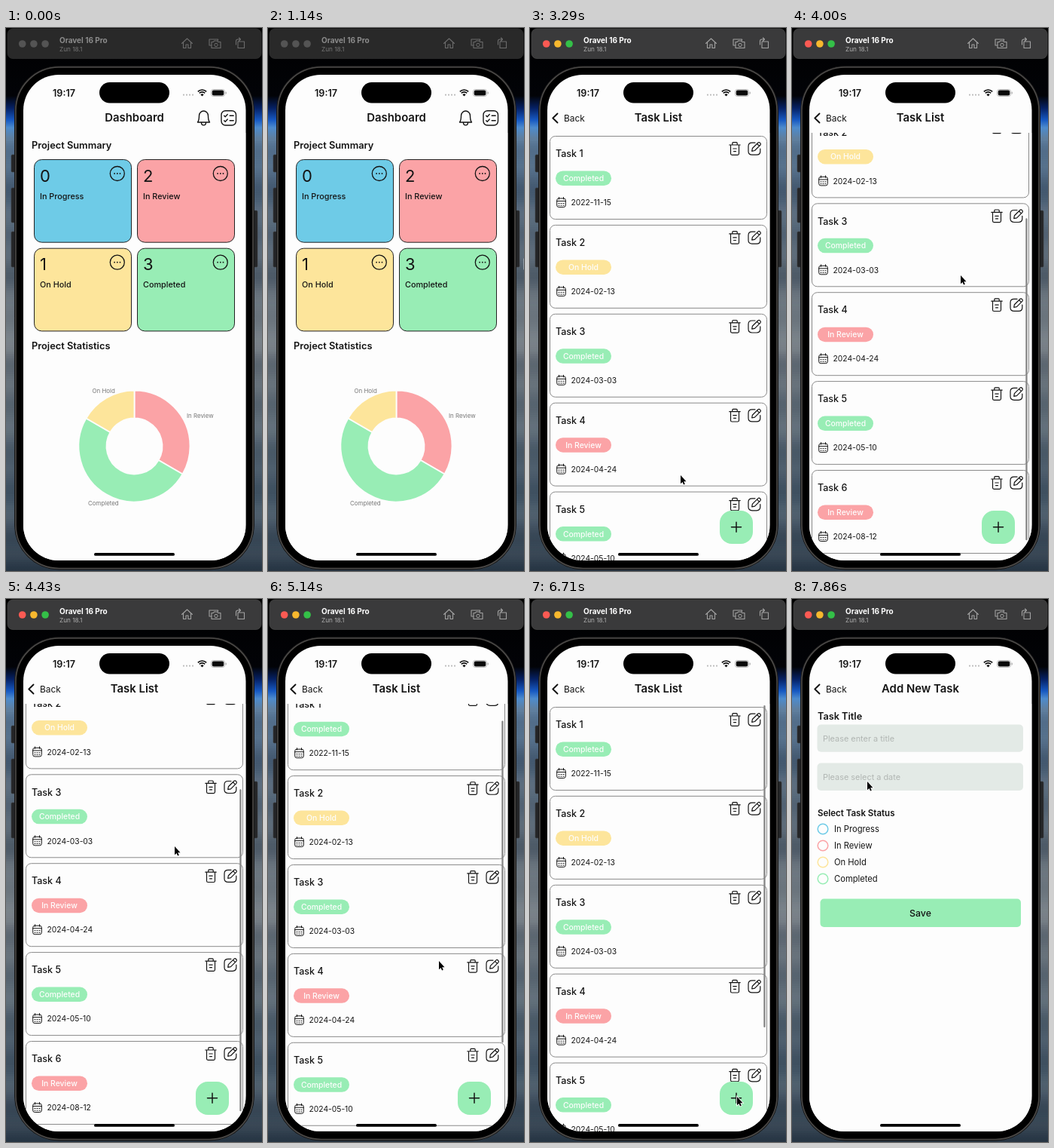
Recreate the animation shown at these times as an HTML page with a canvas. Size 340 by 720 pixels, loop 8 s.

```html
<!DOCTYPE html>
<html lang="en">
<head>
<meta charset="utf-8">
<title>Task app demo</title>
<style>
  html, body { margin: 0; width: 100%; height: 100%; overflow: hidden; background: #000; }
  canvas { display: block; width: 340px; height: 720px; }
</style>
</head>
<body>
<canvas id="stage"></canvas>
<script>
const canvas = document.getElementById('stage');
const ctx = canvas.getContext('2d');
const dpr = window.devicePixelRatio || 1;
canvas.width = 340 * dpr;
canvas.height = 720 * dpr;

const LOOP = 8000, FPS = 7;
const INK = '#141414', PAPER = '#fdfdfd';
const STATUS = {
  'In Progress': '#6ecbe7', 'In Review': '#fba3a6', 'On Hold': '#fde59b', 'Completed': '#98edb5'
};
const GREEN = STATUS.Completed;
const TASKS = [
  ['Completed', '2022-11-15'], ['On Hold', '2024-02-13'], ['Completed', '2024-03-03'],
  ['In Review', '2024-04-24'], ['Completed', '2024-05-10'], ['In Review', '2024-08-12']
];
const ICONS = {
  bell: 'M-8 5.5C-6 3-6 1-6-3C-6-7-3-9.5 0-9.5C3-9.5 6-7 6-3C6 1 6 3 8 5.5ZM-3 6C-3 10.5 3 10.5 3 6',
  checklist: 'M-6-3l1.5 1.5 3-3.2M-6 3.5l1.5 1.5 3-3.2M1.5-3H6.5M1.5 3.5H6.5',
  trash: 'M-7.2-5H7.2M-3.2-5V-7.3Q-3.2-8.3-2.2-8.3H2.2Q3.2-8.3 3.2-7.3V-5M-5.5-5V6.5Q-5.5 8.3-3.7 8.3H3.7Q5.5 8.3 5.5 6.5V-5M-2.2 0H2.2M-1.5 3.6H1.5',
  edit: 'M1-7.8H-3Q-8-7.8-8-3V3.5Q-8 8.2-3 8.2H3Q7.8 8.2 7.8 3.5V0M-3.3 3.3L-2.6-.5L5-8Q6.2-9 7.6-7.6Q9-6.2 8-5L.5 2.5ZM3.5-6.5L6.5-3.5',
  calendar: 'M-6-2H6M-3-7V-4.5M3-7V-4.5M-3.5 1h1M-.5 1h1M2.5 1h1M-3.5 3.7h1M-.5 3.7h1M2.5 3.7h1',
  chevron: 'M3-6L-3.2 0L3 6',
  plus: 'M-6.5 0H6.5M0-6.5V6.5',
  home: 'M-7 0L0-6.5L7 0M-5-1.5V6H-1.5V1.5H1.5V6H5V-1.5',
  camera: 'M-5 2.5H-7.5V-5.5H4V-4M-4.5-2H-2L-1-3.5H3L4-2H7.5V6H-4.5Z',
  rotate: 'M-3.5-2.5H5V6H-3.5ZM-6 1.5V-3Q-6-5.5-3.5-5.5H0M-2-7.5L0-5.5L-2-3.5'
};
for (const name in ICONS) ICONS[name] = new Path2D(ICONS[name]);

const clamp = v => Math.max(0, Math.min(1, v));
const smooth = v => v * v * (3 - 2 * v);
const pushEase = v => 1 - (1 - clamp(v)) ** 3;

// Eased interpolation through [time, ...values] keys.
function track(t, keys) {
  let i = 0;
  while (i < keys.length - 2 && t >= keys[i + 1][0]) i++;
  const [a, b] = [keys[i], keys[i + 1]];
  const k = smooth(clamp((t - a[0]) / (b[0] - a[0])));
  return a.slice(1).map((v, n) => v + (b[n + 1] - v) * k);
}

const CURSOR = [
  [1000, 346, 330], [1710, 293, 116], [2430, 293, 116], [3140, 200, 593], [3430, 200, 593],
  [4000, 224, 328], [4570, 224, 328], [5140, 227, 480], [5700, 227, 480], [6430, 275, 660],
  [7000, 275, 660], [7700, 100, 242]
];
const SCROLL = [[3430, 0], [4000, 146.5], [4600, 146.5], [5347, 0]];

function box(x, y, w, h, r, fill, stroke, lw = 1) {
  ctx.beginPath();
  ctx.roundRect(x, y, w, h, r);
  if (fill) { ctx.fillStyle = fill; ctx.fill(); }
  if (stroke) { ctx.strokeStyle = stroke; ctx.lineWidth = lw; ctx.stroke(); }
}

function circle(x, y, r, fill, stroke, lw = 1) {
  box(x - r, y - r, 2 * r, 2 * r, r, fill, stroke, lw);
}

function text(str, x, y, size, weight = 400, color = INK, align = 'left') {
  ctx.font = `${weight} ${size}px Inter, "Open Sans", sans-serif`;
  ctx.textAlign = align;
  ctx.fillStyle = color;
  ctx.fillText(str, x, y);
}

function icon(name, x, y, lw = 1.2, color = INK) {
  ctx.save();
  ctx.translate(x, y);
  ctx.lineCap = ctx.lineJoin = 'round';
  ctx.lineWidth = lw;
  ctx.strokeStyle = color;
  ctx.stroke(ICONS[name]);
  ctx.restore();
}

function wallpaper() {
  const sky = ctx.createLinearGradient(0, 0, 0, 720);
  const stops = [
    [0, '#000'], [90, '#020307'], [106, '#052063'], [122, '#1759c2'], [132, '#4d8bcd'], [146, '#5f7f9f'],
    [230, '#4b5f74'], [330, '#5f6b76'], [430, '#747c83'], [520, '#566470'], [620, '#485a6a'], [720, '#2b3947']
  ];
  stops.forEach(([y, c]) => sky.addColorStop(y / 720, c));
  ctx.fillStyle = sky;
  ctx.fillRect(0, 0, 340, 720);
  for (let y = 150; y < 720; y += 3) {
    const cloud = Math.sin(y * 0.11) + Math.sin(y * 0.047 + 2);
    ctx.fillStyle = cloud > 0 ? `rgba(200,205,210,${cloud * 0.06})` : `rgba(10,25,45,${-cloud * 0.1})`;
    ctx.fillRect(0, y, 340, 3);
  }
}

function toolbar(active) {
  box(2, 1, 337, 39.5, 7, active ? '#3a3a3b' : '#292929', active ? '#4a4a4a' : '#333', 0.7);
  ['#fb5a53', '#f7b82e', '#34c048'].forEach((c, i) => circle(21.7 + i * 15.2, 21, 4.8, active ? c : '#545454'));
  text('Oravel 16 Pro', 71, 20, 10, 700, active ? '#fff' : '#8c8c8c');
  text('Zun 18.1', 71, 30.5, 8.2, 400, active ? '#b0b0b0' : '#777');
  const tint = active ? '#a2a2a2' : '#6c6c6c';
  icon('home', 240.5, 20.5, 1.1, tint);
  icon('camera', 277.5, 20.5, 1.1, tint);
  circle(279, 22.5, 2.2, null, tint);
  icon('rotate', 311.5, 20.5, 1.1, tint);
}

function phoneBody() {
  for (const [x, y, h] of [[7, 168, 23], [7, 212, 46], [7, 270, 47], [329, 242, 75]]) {
    box(x, y, 5, h, 1.5, '#242527', '#3d3e40', 0.6);
  }
  box(11.5, 50.5, 318, 667.5, 59, '#1c1b1b', '#171717', 1);
  box(13, 52, 315, 664.5, 57.5, '#000', '#4c4a48', 1.6);
  box(15.5, 54.5, 310, 659.5, 55, '#000');
}

function statusBar() {
  text('19:17', 77, 90.5, 12.6, 600, INK, 'center');
  box(124, 72, 93, 27.5, 13.7, '#000');
  for (let i = 0; i < 4; i++) circle(236 + i * 4, 88.7, 1.1, '#bdbdbd');
  ctx.strokeStyle = ctx.fillStyle = '#0a0a0a';
  ctx.lineWidth = 1.7;
  for (const r of [8, 5.2]) {
    ctx.beginPath();
    ctx.arc(260.5, 90, r, -Math.PI * 0.75, -Math.PI * 0.25);
    ctx.stroke();
  }
  ctx.beginPath();
  ctx.moveTo(260.5, 90.5);
  ctx.arc(260.5, 90.5, 3, -Math.PI * 0.75, -Math.PI * 0.25);
  ctx.fill();
  box(272.5, 81.5, 18, 9, 2.8, null, '#aaa', 0.8);
  box(273.7, 82.6, 15.6, 6.8, 2, '#0a0a0a');
  box(291.6, 84.5, 1.2, 3, 0.6, '#aaa');
}

function donut(cx, cy) {
  let from = -Math.PI / 2;
  for (const [name, count] of [['In Review', 2], ['Completed', 3], ['On Hold', 1]]) {
    const to = from + count * Math.PI / 3;
    ctx.beginPath();
    ctx.arc(cx, cy, 74, from, to);
    ctx.arc(cx, cy, 37, to, from, true);
    ctx.closePath();
    ctx.fillStyle = STATUS[name];
    ctx.strokeStyle = PAPER;
    ctx.lineWidth = 1.8;
    ctx.fill();
    ctx.stroke();
    from = to;
  }
}

function dashboard() {
  text('Project Summary', 34, 159.5, 12.8, 600);
  const cards = [['In Progress', 0], ['In Review', 2], ['On Hold', 1], ['Completed', 3]];
  cards.forEach(([name, count], i) => {
    const x = 37.5 + (i % 2) * 137, y = 174.5 + (i >> 1) * 117.7;
    box(x, y, 129, 109.7, 10, STATUS[name], '#222', 1);
    text(count, x + 7.5, y + 29, 22);
    text(name, x + 7.5, y + 52, 10.8, 500);
    circle(x + 110.3, y + 18.5, 9.5, null, INK, 1.3);
    for (const d of [-3.7, 0, 3.7]) circle(x + 110.3 + d, y + 18.5, 0.9, INK);
  });
  text('Project Statistics', 34, 426, 12.8, 600);
  donut(170.5, 554.5);
  text('In Review', 240, 517, 7.9, 400, '#777');
  text('On Hold', 114.5, 483.5, 7.9, 400, '#777');
  text('Completed', 109, 632.5, 7.9, 400, '#777');
}

function taskList(t) {
  const [scroll] = track(t, SCROLL);
  TASKS.forEach(([status, date], i) => {
    const y = 143.5 + i * 117.9 - scroll;
    box(26.5, y, 288, 110, 7, null, '#8a8a8a', 1);
    text('Task ' + (i + 1), 34, y + 27.7, 12.5, 500);
    box(34, y + 46, 74, 19.5, 9.7, STATUS[status]);
    text(status, 71, y + 59.5, 10.4, 500, PAPER, 'center');
    box(35.7, y + 82.5, 11.6, 11.5, 2.5, null, INK, 1);
    icon('calendar', 41.5, y + 88, 1);
    text(date, 54.5, y + 91.7, 10.3);
    icon('trash', 272, y + 16.5);
    icon('edit', 298, y + 16.5);
  });
  ctx.globalAlpha = clamp((t - 3430) / 200);
  box(310.3, 141 + scroll * 0.76, 2.3, 427, 1.1, '#858585');
  ctx.globalAlpha = 1;
  box(252, 640, 44, 44, 16, GREEN);
  icon('plus', 274, 661.7, 1.5);
}

function taskForm() {
  text('Task Title', 34, 159.5, 12.7, 600);
  box(33.5, 166.5, 273.5, 36.3, 5, '#e3eae6');
  text('Please enter a title', 41, 188.5, 10.9, 400, '#b1b6b3');
  box(33.5, 217.5, 273.5, 36.5, 5, '#e3eae6');
  text('Please select a date', 41, 239.8, 10.9, 400, '#b1b6b3');
  text('Select Task Status', 34, 287.5, 11.5, 600);
  Object.entries(STATUS).forEach(([name, color], i) => {
    const y = 305 + i * 22;
    circle(41, y, 6.8, null, color, 1.5);
    text(name, 56, y + 4, 11.2);
  });
  box(37.5, 397.5, 266.5, 37.5, 5, GREEN);
  text('Save', 170.5, 420.8, 12.3, 500, INK, 'center');
}

const PAGES = [
  { title: 'Dashboard', draw: dashboard },
  { title: 'Task List', draw: taskList },
  { title: 'Add New Task', draw: taskForm }
];

function page(index, shift, t) {
  ctx.save();
  ctx.translate(shift, 0);
  ctx.beginPath();
  ctx.rect(23, 139, 295.5, 570);
  ctx.clip();
  ctx.fillStyle = PAPER;
  ctx.fillRect(23, 139, 296, 570);
  PAGES[index].draw(t);
  ctx.restore();
}

function header(index, shift, alpha) {
  ctx.globalAlpha = alpha;
  text(PAGES[index].title, 170.5 + shift, 124, 14.9, 600, INK, 'center');
  if (index === 0) {
    icon('bell', 262.5, 119.5, 1.4);
    box(286, 109.7, 19.5, 19.3, 5.5, null, INK, 1.4);
    icon('checklist', 295.7, 119.3, 1.4);
  }
  ctx.globalAlpha = 1;
}

function screen(t) {
  const toList = pushEase((t - 2400) / 500);
  const toForm = pushEase((t - 6900) / 500);
  const position = toList + toForm;
  const from = Math.floor(position), p = position - from;
  ctx.save();
  ctx.beginPath();
  ctx.roundRect(23, 62, 295.5, 644, 47);
  ctx.clip();
  ctx.fillStyle = PAPER;
  ctx.fillRect(23, 62, 296, 645);
  page(from, -p * 89, t);
  if (p > 0) {
    ctx.fillStyle = `rgba(0,0,0,${0.08 * p})`;
    ctx.fillRect(23, 139, 296, 570);
    page(from + 1, (1 - p) * 295.5, t);
    header(from + 1, (1 - p) * 120, p);
  }
  header(from, -p * 90, 1 - p);
  ctx.globalAlpha = toList;
  icon('chevron', 33.5, 119.5, 1.9);
  text('Back', 45, 124, 11.9);
  ctx.globalAlpha = 1;
  statusBar();
  box(117, 696, 107, 3.8, 1.9, '#000');
  ctx.restore();
}

const ARROW = new Path2D('M0 0V11.2L2.5 9L4.1 12.5L5.8 11.7L4.2 8.2H7.5Z');
function cursor(t) {
  if (t < CURSOR[0][0]) return;
  ctx.save();
  ctx.translate(...track(t, CURSOR));
  ctx.lineWidth = 1.6;
  ctx.strokeStyle = '#fff';
  ctx.stroke(ARROW);
  ctx.fillStyle = '#000';
  ctx.fill(ARROW);
  ctx.restore();
}

function render(now) {
  const step = Math.min(LOOP / 1000 * FPS - 1, Math.floor((now % LOOP + 4) * FPS / 1000));
  const t = step * 1000 / FPS;
  ctx.setTransform(dpr, 0, 0, dpr, 0, 0);
  wallpaper();
  toolbar(t >= 1800);
  phoneBody();
  screen(t);
  cursor(t);
}

const start = performance.now();
function tick() {
  render(performance.now() - start);
  requestAnimationFrame(tick);
}
tick();
</script>
</body>
</html>
```
